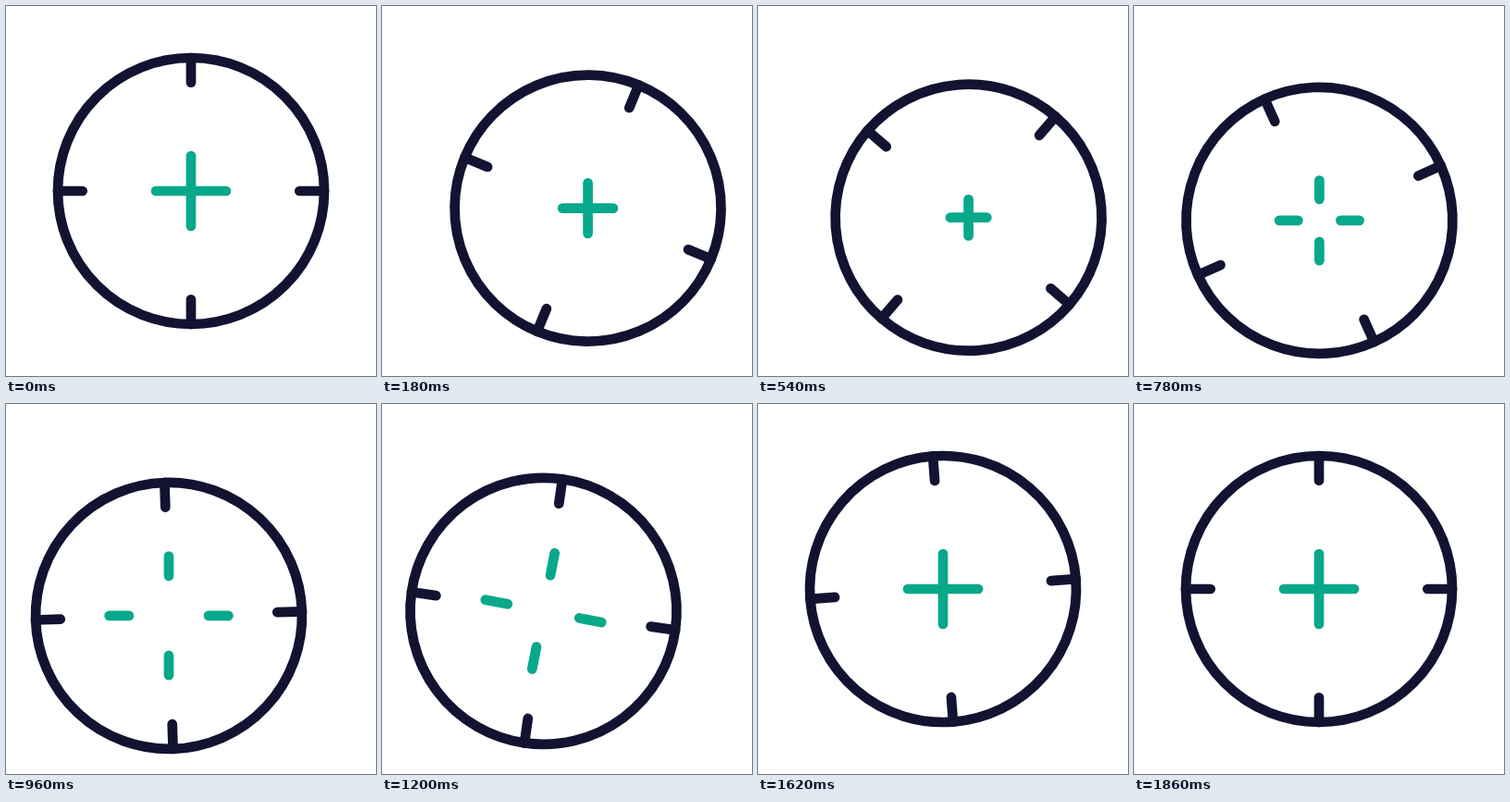
An HTML page for the animation above (3.92 s loop, 400 by 400 pixels).

```html
<!DOCTYPE html>
<html lang="en">
<head>
<meta charset="utf-8">
<title>Crosshair</title>
<style>
  html, body { margin: 0; width: 100%; height: 100%; overflow: hidden; background: #fff; }
  svg { display: block; width: 100vw; height: 100vh; }
  g { fill: none; stroke-width: 10.7; stroke-linecap: round; }
</style>
</head>
<body>
<svg viewBox="0 0 400 400">
  <g id="ring" stroke="#121331"><circle r="144"/><path id="ticks"/></g>
  <g id="cross" stroke="#08a88a"><path id="arms"/></g>
</svg>
<script>
const LOOP = 3920, STEP = 30, LAST_STEP = 62;
const [ring, ticks, cross, arms] =
  ['ring', 'ticks', 'cross', 'arms'].map(id => document.getElementById(id));

// Timing curve cubic-bezier(x1, 0, x2, 1), solved by bisection.
function ease(u, x1, x2) {
  let low = 0, high = 1, s;
  for (let i = 0; i < 30; i++) {
    s = (low + high) / 2;
    const x = 3 * s * (1 - s) * (x1 * (1 - s) + x2 * s) + s ** 3;
    if (x < u) low = s; else high = s;
  }
  return s * s * (3 - 2 * s);
}

const progress = (step, start, end, x1 = .5, x2 = .5) =>
  ease(Math.min(1, Math.max(0, (step - start) / (end - start))), x1, x2);

// Value after passing through successive poses, one progress per leg.
const blend = (poses, legs) =>
  legs.reduce((sum, p, i) => sum + (poses[i + 1] - poses[i]) * p, poses[0]);

// Four radial strokes between two distances from the center.
const spokes = (from, to) =>
  `M0 ${-from}V${-to}M${from} 0H${to}M0 ${from}V${to}M${-from} 0H${-to}`;

function draw(time) {
  const step = Math.min(LAST_STEP, Math.floor(time % LOOP / STEP));

  // Three legs: out to the lower right, across to the lower left, home.
  const out = progress(step, 0, 16, .33, .26);
  const across = progress(step, 16, 36);
  const home = progress(step, 36, 51);
  const turn = [out, across, progress(step, 36, LAST_STEP, .41, .08)];
  const move = [progress(step, 0, 14, .33, .16), across, progress(step, 36, 50, .6, .4)];
  const shape = [out, across, home];

  // Every leg of the triangular route bows outwards.
  const [right, down, left] = move.map(p => 4 * p * (1 - p));
  const x = blend([200, 228.4, 172.4, 200], move) + 2.5 * (right - left);
  const y = blend([200, 228.5, 228, 200], move) + 3.6 * down - 2.5 * (right + left);

  const place = (node, angle) =>
    node.setAttribute('transform', `translate(${x} ${y}) rotate(${angle})`);
  place(ring, blend([0, 40, 91.5, 180], turn));
  place(cross, 90 * home);
  arms.setAttribute('d', spokes(blend([-8, 0, 46, -8], shape), blend([38, 19, 67.5, 38], shape)));
}

let origin;
function tick(now) {
  origin ??= now;
  draw(now - origin);
  requestAnimationFrame(tick);
}
ticks.setAttribute('d', spokes(117.3, 144));
draw(0);
requestAnimationFrame(tick);
</script>
</body>
</html>
```
